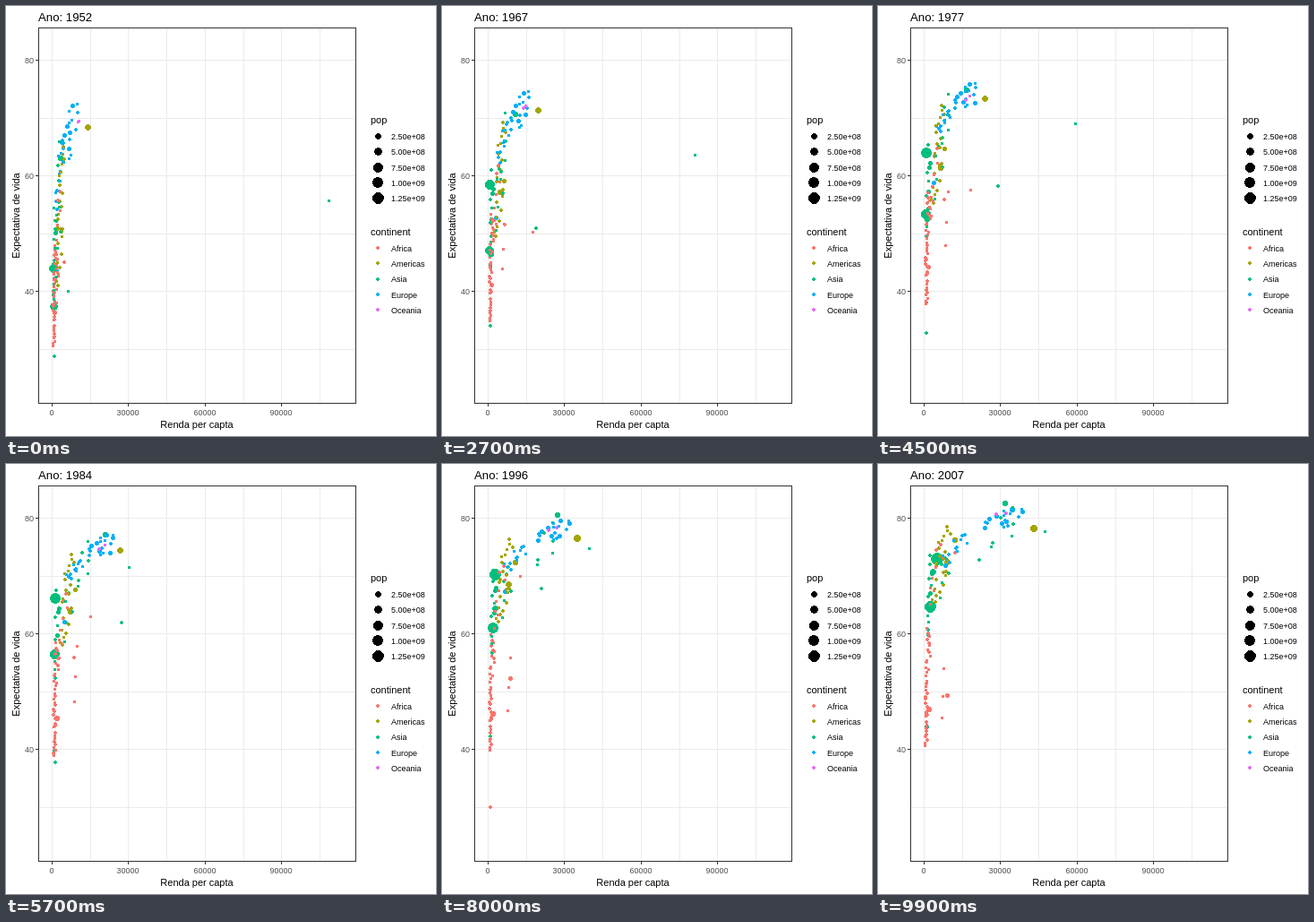
Recreate the animation shown at these times as an HTML page. Size 480 by 480 pixels, loop 10000 ms.

```html
<!DOCTYPE html>
<html lang="pt">
<head>
<meta charset="utf-8">
<title>Expectativa de vida e renda</title>
<style>
html, body { margin: 0; width: 100%; height: 100%; overflow: hidden; background: #fff; }
svg { display: block; width: 480px; height: 480px; font: 11px "Liberation Sans", Arial, sans-serif; }
circle, path, rect { shape-rendering: crispEdges; }
.small { font-size: 9px; }
.axis { fill: #4d4d4d; }
</style>
</head>
<body>
<svg id="stage" viewBox="0 0 480 480">
  <text id="title" x="36" y="17" font-size="13.2"></text>
  <path id="grid" stroke="#ebebeb" fill="none"/>
  <g id="dots"></g>
  <rect x="36.5" y="24.5" width="354" height="419" fill="none" stroke="#333"/>
  <path id="ticks" stroke="#333" fill="none"/>
  <text x="213" y="471" text-anchor="middle">Renda per capta</text>
  <text transform="translate(15 234) rotate(-90)" text-anchor="middle">Expectativa de vida</text>
  <text x="407" y="131">pop</text>
  <text x="407" y="256">continent</text>
</svg>
<script>
const FRAMES = 100, FRAME_MS = 100, FIRST_YEAR = 1952, SPAN = 55;
const COLORS = { Africa: '#F8766D', Americas: '#A3A500', Asia: '#00BF7D', Europe: '#00B0F6', Oceania: '#E76BF3' };

let seed = 1952;
function random() {
  seed = (seed * 1664525 + 1013904223) % 4294967296;
  return seed / 4294967296;
}

const lerp = (a, b, p) => a + (b - a) * p;

// Track points are spread evenly over the whole time span
function valueAt(track, p) {
  const pos = p * (track.length - 1);
  const i = Math.min(Math.floor(pos), track.length - 2);
  return lerp(track[i], track[i + 1], pos - i);
}

const countries = [];

// Population is in millions, at the start and at the end
function mover(continent, pop, income, life) {
  countries.push({ continent, pop, income, life });
}

// Each member keeps its place between the region's low and high tracks
function region(continent, count, maxPop, income, life) {
  for (let i = 0; i < count; i++) {
    const rank = (i + random()) / count;
    const wealth = lerp(rank, random(), 0.5);
    const pop = 0.3 + maxPop * random() ** 2;
    mover(continent, [pop, pop * 2],
      income.low.map((low, k) => low * (income.high[k] / low) ** wealth),
      life.low.map((low, k) => lerp(low, life.high[k], rank)));
  }
}

const band = (low, high) => ({ low, high });

// Giants and countries with a path of their own
mover('Asia', [556, 1319], [400, 700, 1500, 4959], [44, 50.5, 44.5, 58.4, 63.1, 64, 65.5, 67.3, 68.7, 70.4, 72, 73]);
mover('Asia', [372, 1110], [547, 850, 2452], [37.4, 55, 64.7]);
mover('Asia', [82, 224], [750, 1450, 3541], [37.5, 54, 70.7]);
mover('Asia', [86, 127], [3217, 12500, 24000, 31656], [63, 72.4, 78.9, 82.6]);
mover('Asia', [0.2, 2.5], [108382, 113523, 95458, 80895, 109348, 59265, 31354, 28118, 34933, 40301, 35110, 47307], [55.6, 70.3, 77.6]);
mover('Asia', [4, 28], [6460, 12500, 29500, 27000, 20700, 21655], [40, 60, 72.8]);
mover('Asia', [8, 32], [779, 975], [28.8, 33.5, 39, 41.7, 43.8]);
mover('Asia', [5, 14], [400, 1700], [39.4, 45.5, 30, 55.8, 59.7]);
mover('Americas', [158, 301], [13990, 20900, 29000, 42952], [68.4, 73.8, 78.2]);
mover('Americas', [57, 190], [2109, 6800, 9066], [50.9, 62.3, 72.4]);
mover('Americas', [30, 109], [3478, 8600, 11978], [50.8, 66, 76.2]);
mover('Europe', [69, 82], [7144, 21200, 32170], [67.5, 73, 79.4]);
mover('Europe', [22, 71], [1969, 4250, 8458], [43.6, 60.2, 71.8]);
mover('Africa', [33, 135], [1077, 1800, 2014], [36.3, 45, 46.9]);
mover('Africa', [14, 44], [4725, 8300, 9270], [45, 57, 49.3]);
mover('Africa', [1, 6], [2388, 21000, 13000, 12057], [42.7, 52, 67, 74]);
mover('Africa', [2.5, 9], [493, 863], [40, 44, 45.6, 25, 46.2]);

region('Africa', 36, 10, band([350, 480, 350], [2300, 3200, 3000]), band([30, 38, 40], [48, 58, 61]));
region('Africa', 8, 10, band([1400, 2500, 2000], [3500, 6500, 9000]), band([42, 54, 65], [58, 66, 76]));
region('Africa', 3, 1, band([900, 6000, 5000], [4700, 19000, 13300]), band([36, 45, 42], [45, 62, 57]));
region('Asia', 13, 40, band([400, 600, 1000], [1800, 3500, 4500]), band([36, 50, 60], [55, 67, 74]));
region('Asia', 5, 12, band([1000, 3000, 4500], [5000, 10000, 12400]), band([42, 57, 66], [57, 67, 74]));
region('Asia', 6, 12, band([1300, 6000, 22000], [4100, 14000, 45000]), band([48, 66, 74], [66, 75, 82]));
region('Americas', 22, 15, band([1500, 2600, 2700], [7000, 12000, 16000]), band([40, 56, 65], [66, 73.5, 79]));
region('Europe', 16, 45, band([3400, 11000, 21000], [13500, 26000, 46000]), band([62, 72.5, 78.2], [73, 76.5, 81.8]));
region('Europe', 12, 15, band([1000, 4500, 6000], [6900, 14000, 22500]), band([54, 69, 72.3], [67, 72, 77.5]));
region('Oceania', 2, 6, band([10100, 15500, 25200], [10600, 19500, 34400]), band([69.2, 72.5, 80.2], [69.5, 75, 81.2]));
countries.sort((a, b) => b.pop[0] - a.pop[0]);

const $ = id => document.getElementById(id);
const px = income => 51.45 + income * 0.00285;
const py = life => 576.5 - life * 6.45;
const sizeWidth = size => Math.round((size * 2.845 + 0.94) * 0.75);
const popWidth = pop => sizeWidth(1 + 5 * Math.sqrt(Math.min(1, pop / 1319)));

function add(parent, tag, attrs, text) {
  const el = document.createElementNS('http://www.w3.org/2000/svg', tag);
  for (const key in attrs) el.setAttribute(key, attrs[key]);
  if (text) el.textContent = text;
  return parent.appendChild(el);
}

// Dots have whole-pixel widths and sit on the pixel grid
function placeDot(dot, x, y, width) {
  const snap = v => width % 2 ? Math.floor(v) + 0.5 : Math.round(v);
  dot.setAttribute('cx', snap(x));
  dot.setAttribute('cy', snap(y));
  dot.setAttribute('r', width / 2 - 0.1);
}

function buildAxes() {
  const stage = $('stage');
  const snap = v => Math.floor(v) + 0.5;
  let grid = '', ticks = '';
  for (let v = 0; v <= 105000; v += 15000) {
    const x = snap(px(v));
    grid += `M${x} 25V443`;
    if (v % 30000) continue;
    ticks += `M${x} 444v3`;
    add(stage, 'text', { x: x - 0.5, y: 457, class: 'small axis', 'text-anchor': 'middle' }, String(v));
  }
  for (let v = 30; v <= 80; v += 10) {
    const y = snap(py(v));
    grid += `M37 ${y}H390`;
    if (v % 20) continue;
    ticks += `M33 ${y}h3`;
    add(stage, 'text', { x: 31, y: y + 3.5, class: 'small axis', 'text-anchor': 'end' }, String(v));
  }
  $('grid').setAttribute('d', grid);
  $('ticks').setAttribute('d', ticks);
}

function buildLegend() {
  const stage = $('stage');
  const addKey = (y, width, fill, label) => {
    placeDot(add(stage, 'circle', { fill }), 415.3, y, width);
    add(stage, 'text', { x: 430, y: Math.round(y + 3.7), class: 'small' }, label);
  };
  for (let i = 0; i < 5; i++) {
    const pop = (i + 1) * 2.5e8;
    const label = pop.toExponential(2).replace('+', '+0');
    addKey(145.5 + i * 17.28, popWidth(pop / 1e6), '#000', label);
  }
  Object.entries(COLORS).forEach(([name, color], i) =>
    addKey(270 + i * 17.28, sizeWidth(1.5), color, name));
}

buildAxes();
buildLegend();
for (const c of countries) c.dot = add($('dots'), 'circle', { fill: COLORS[c.continent] });

let shown = -1;
function draw() {
  const frame = Math.floor(performance.now() / FRAME_MS) % FRAMES;
  if (frame !== shown) {
    shown = frame;
    const p = frame / (FRAMES - 1);
    $('title').textContent = 'Ano: ' + Math.round(FIRST_YEAR + p * SPAN);
    for (const { dot, pop, income, life } of countries)
      placeDot(dot, px(valueAt(income, p)), py(valueAt(life, p)), popWidth(valueAt(pop, p)));
  }
  requestAnimationFrame(draw);
}
draw();
</script>
</body>
</html>
```
